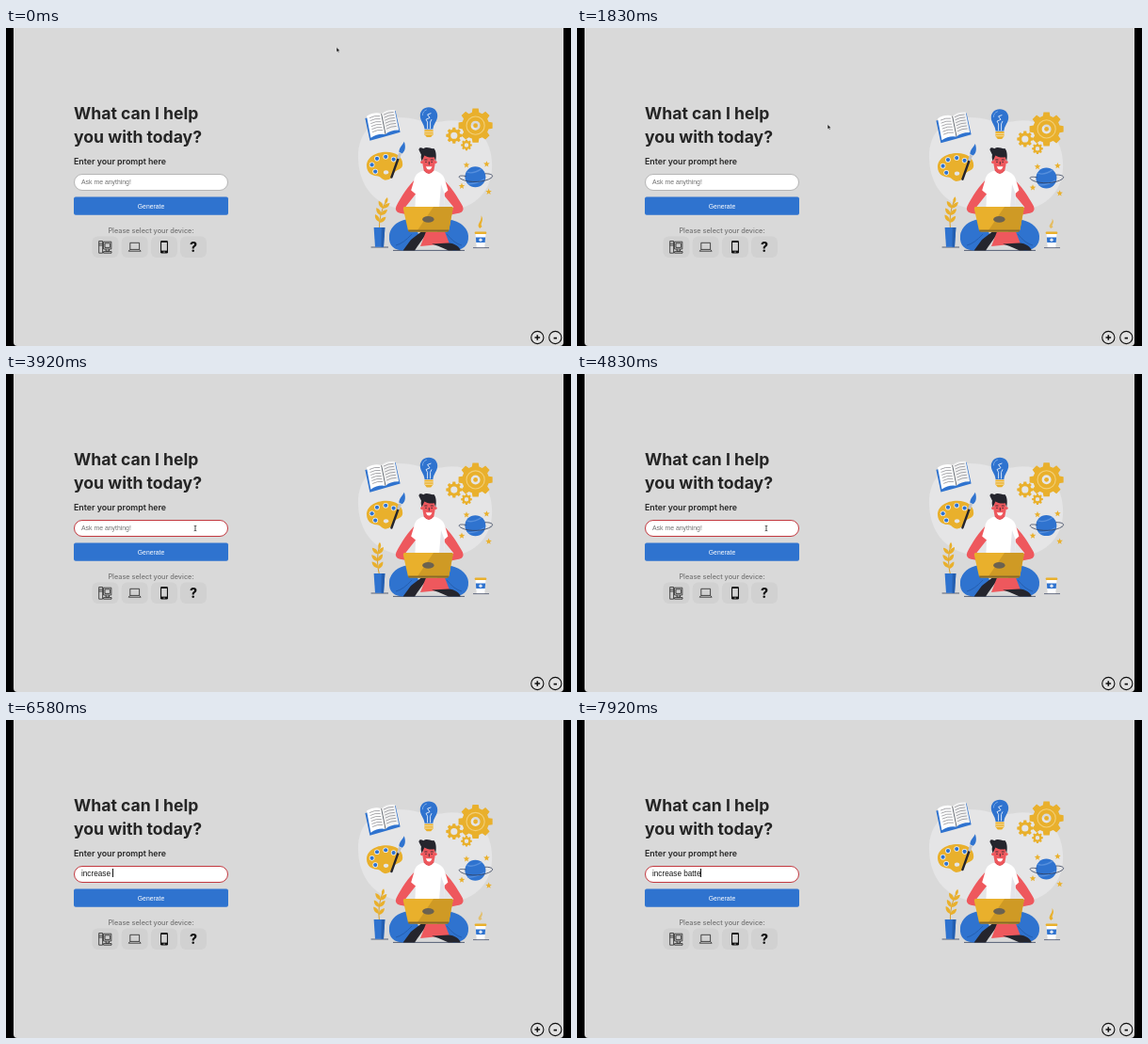
Write an HTML page that moves like this. It is 600 px wide and 338 px high and loops after 8000 ms.

```html
<!DOCTYPE html>
<html lang="en">
<head>
<meta charset="utf-8">
<title>Prompt page</title>
<style>
  html, body { margin: 0; width: 100%; height: 100%; overflow: hidden; background: #000; }
  #stage { position: relative; width: 600px; height: 338px; --u: 0; }
  svg { position: absolute; left: 0; top: 0; display: block; }
  .ui { font-family: Inter, "Open Sans", sans-serif; fill: #252525; }
  .arial { font-family: "Liberation Sans", Arial, sans-serif; }
  .field {
    position: absolute; left: 72px; top: 154.7px; width: 164px; height: 18.3px;
    box-sizing: border-box; border: 0.8px solid #b5b5b5; border-radius: 9.2px;
    background: #fff; padding-left: 7px; white-space: pre;
    font: 8.2px/16.9px "Liberation Sans", Arial, sans-serif; color: #161616;
  }
  .field.focus { border-color: #c2383f; }
  .hint { font-size: 6.9px; color: #707070; position: absolute; left: 7px; top: 0; }
  .caret { display: inline-block; width: 0.7px; height: 9px; background: #111; vertical-align: -1.6px; }
  .bob { transform: translateY(calc(var(--u) * var(--d) * 1px)); }
  #leaves { transform-origin: 396px 213px; transform: rotate(calc(var(--u) * -14deg)); }
  #steam { transform-origin: 503px 213px; transform: scaleY(calc(1 - var(--u) * .6)); opacity: calc(1.25 - var(--u) * 1.3); }
  .y { fill: #e9b02c; } .b { fill: #2f73cf; } .r { fill: #ee585d; } .k { fill: #25252d; } .w { fill: #fff; }
</style>
</head>
<body>
<div id="stage">
  <svg width="600" height="338" viewBox="0 0 600 338">
    <defs>
      <path id="star" d="M0-3.4 .9-1.1 3.3-1 1.4.6 2 2.9 0 1.6-2 2.9-1.4.6-3.3-1-.9-1.1Z"/>
      <path id="leaf" d="M0 0C-.8-4 1.2-6.4 4.6-8 5.2-4 3.6-1.2 0 0Z"/>
      <g id="dab"><circle r="2.8" fill="#f4f4f4"/><circle r="2.1" class="b"/></g>
    </defs>
    <path d="M8 0H592V334Q592 338 588 338H12Q8 338 8 334Z" fill="#d9d9d9"/>

    <g class="ui">
      <g font-size="17.6" font-weight="700">
        <text x="72" y="96.5">What can I help</text>
        <text x="72" y="122">you with today?</text>
      </g>
      <text x="72" y="144.8" font-size="8.8" font-weight="600">Enter your prompt here</text>
      <text x="154" y="217.6" font-size="7.3" font-weight="500" text-anchor="middle" style="fill:#747474">Please select your device:</text>
    </g>
    <rect x="72" y="179.6" width="164" height="19.2" rx="2" class="b"/>
    <text x="154" y="191.6" font-size="6.8" text-anchor="middle" class="arial w">Generate</text>

    <!-- device tiles -->
    <g fill="#d1d1d1">
      <rect x="91.5" y="221.5" width="28" height="22.5" rx="6"/>
      <rect x="122.7" y="221.5" width="28" height="22.5" rx="6"/>
      <rect x="153.9" y="221.5" width="28" height="22.5" rx="6"/>
      <rect x="185" y="221.5" width="28" height="22.5" rx="6"/>
    </g>
    <g fill="none" stroke="#222" stroke-width=".8">
      <path d="M98.7 226.5H102.6V239.2H98.7ZM98.7 229H102.6M98.7 231H102.6M103.6 227.2H111.8V235H103.6ZM105 228.8H110.4V233.4H105ZM106 235V237H109.5V235M103.6 239.2V237.6H112V239.2Z"/>
      <path d="M131.8 228.3H141.6V235.4H131.8ZM131.8 235.4 130.2 237.2H143.2L141.6 235.4"/>
    </g>
    <rect x="164" y="226" width="8" height="13.6" rx="1.4" fill="#111"/>
    <rect x="165.1" y="228" width="5.8" height="8.6" fill="#d3d3d3"/>
    <circle cx="168" cy="238.1" r=".7" fill="#d3d3d3"/>
    <text x="199" y="237.8" font-size="14" font-weight="800" text-anchor="middle" class="ui" style="fill:#111">?</text>

    <!-- zoom buttons -->
    <g fill="#e2e2e2" stroke="#111" stroke-width="1.1">
      <circle cx="564.3" cy="329" r="6.6"/><circle cx="583.3" cy="329" r="6.6"/>
    </g>
    <path d="M561.5 329H567.1M564.3 326.2V331.8M581.6 329.6H585" stroke="#111" stroke-width="1.6"/>

    <!-- illustration -->
    <path d="M374 139C373 112 389 96 414 95 436 94 443 103 465 99 492 94 514 112 516 142 518 171 499 195 463 194 441 193 428 196 407 189 386 181 375 163 374 139Z" fill="#e5e5e6"/>

    <g class="bob" style="--d:6">
      <path class="b" d="M381.4 96 386.4 119.8 402 115.4 418.6 110.6 413.6 88 398 92Z"/>
      <path class="w" d="M383 93.6Q392 88.6 398.6 91.2L403 113Q395 111.4 387.4 116.8Z"/>
      <path fill="#f3f3f3" d="M398.6 91.2Q404 86.4 412.8 87L417.2 108.4Q408 108.2 403 113Z"/>
      <path d="M398.6 91.2 403 113" stroke="#444" stroke-width=".7"/>
      <g id="lines" fill="none" stroke="#6d6d74" stroke-width=".6"></g>
    </g>

    <g class="bob" style="--d:4.5">
      <path class="b" d="M449 84.3C443.4 84.3 439.8 88.2 439.8 93.2 439.8 99 444 101.4 444.6 107.6H453.4C454 101.4 458.2 99 458.2 93.2 458.2 88.2 454.6 84.3 449 84.3Z"/>
      <path d="M442.3 93Q442.5 88.2 446.8 86.8" fill="none" stroke="#79a9e6" stroke-width="1"/>
      <path d="M447.6 107V100L446 97.2 450 95.4 447.6 92 451.4 90.6M450.6 107V100L452 97" fill="none" stroke="#fff" stroke-width=".8"/>
      <path class="y" d="M444.4 108.2H453.6V113.2L451.2 116H446.8L444.4 113.2Z"/>
      <path d="M444.4 110.4H453.6M444.6 112.8H453.4" stroke="#fff" stroke-width=".6"/>
    </g>

    <g class="bob" style="--d:9" id="gears"></g>

    <g class="bob" style="--d:3">
      <path class="y" d="M383 147C382.6 138 392 131.8 404 131.8 414 131.8 421.4 137 421.2 145 421 150 416 150.4 413.4 152.4 410.6 155 411.4 160 404 161.6 400 162.4 398.4 157.6 393.6 157.2 387.8 156.8 383.4 153.6 383 147Z"/>
      <use href="#dab" x="388.6" y="145.4"/><use href="#dab" x="394" y="138.8"/>
      <use href="#dab" x="403.2" y="136.8"/><use href="#dab" x="411.6" y="139.6"/>
      <use href="#dab" x="392.2" y="152.6"/>
      <ellipse cx="403.6" cy="153.4" rx="2.7" ry="2.1" fill="#e5e5e6"/>
    </g>
    <g class="bob" style="--d:5">
      <path d="M416.8 138 409.4 158.6" stroke="#25252d" stroke-width="2.4" stroke-linecap="round"/>
      <path d="M418.6 133 416.4 139" stroke="#bfc1c7" stroke-width="3"/>
      <path class="b" d="M422.8 120.8C421.4 124.4 417.4 126.8 417.4 131.8L420.8 133.4C424.6 130.4 424.4 125 422.8 120.8Z"/>
    </g>

    <g class="bob" style="--d:3">
      <circle class="b" cx="498.4" cy="158.2" r="11"/>
      <path d="M489.6 153Q496 155.6 505 149.6M490.2 165.4Q498 166.6 508 160.6" fill="none" stroke="#568fdd" stroke-width="1.3"/>
      <path d="M488.6 157.6C481 156 478.8 158 484 160.8 492 165 509 164 515.4 159.2 518.6 156.6 515 154.6 508.6 154.8" fill="none" stroke="#34405c" stroke-width=".8"/>
    </g>
    <g class="bob y" style="--d:4">
      <use href="#star" x="489" y="145.6"/><use href="#star" x="510.4" y="144.6"/><use href="#star" x="484" y="168"/>
      <use href="#star" x="512.6" y="174"/>
    </g>

    <g id="leaves">
      <path d="M396.4 214Q396 198 403.6 184" fill="none" stroke="#d69d25" stroke-width=".9"/>
      <g class="y">
        <use href="#leaf" transform="translate(396.6 207) rotate(18)"/>
        <use href="#leaf" transform="translate(396.6 206) scale(-1 1)"/>
        <use href="#leaf" transform="translate(398 199) rotate(20)"/>
        <use href="#leaf" transform="translate(398 199) scale(-1 1)"/>
        <use href="#leaf" transform="translate(400.4 191.8) rotate(22)"/>
        <use href="#leaf" transform="translate(400.4 191.8) scale(-1 1)"/>
        <use href="#leaf" transform="translate(402.8 187) rotate(-12) scale(.8)"/>
      </g>
    </g>
    <path d="M387.6 233H406" stroke="#34405c" stroke-width=".8"/>
    <path class="b" d="M390.6 212H402.4L401 232.8H392Z"/>
    <path d="M398.8 212H402.4L401 232.8H398.4Z" fill="#255fb0"/>

    <path id="steam" class="y" d="M503.2 213C498.6 208.6 505.6 206 504.6 199.2 508.6 205 502.4 208 505.6 211Z"/>
    <path class="w" d="M498.6 219H509.4L508.2 233.4H499.8Z"/>
    <path class="b" d="M498.9 222.4H509.1L508.7 228H499.3Z"/>
    <circle cx="504" cy="225.2" r="1.7" fill="#dfe8f5"/>
    <rect class="y" x="497.8" y="216.4" width="12.4" height="2.7" rx=".8"/>
    <path d="M496 233.6H513" stroke="#34405c" stroke-width=".7"/>

    <!-- seated figure -->
    <path d="M411 236.4H487" stroke="#34405c" stroke-width=".8"/>
    <path class="b" d="M433 203C420 202 408 209 407 221 406 232 413 236.4 422 236.4L440 226Z"/>
    <path class="b" d="M462 203C476 202 490 209 491 221 491.6 232 484 236.6 475 236.4L455 226Z"/>
    <path d="M414 231Q422 229 431 219M484 231Q476 229 468 219" fill="none" stroke="#255fb0" stroke-width="1"/>
    <path class="k" d="M421.6 236.6 430 225 441 216.4H448L437 232 434 236.6Z"/>
    <path class="r" d="M440 232 446 216.4H466L471 229.4 455 230.6Z"/>
    <path class="k" d="M452 229.6 470 228.4C476 228.6 482.6 233 482.6 236.6H470L459 231.8Z"/>
    <path class="r" d="M435.6 160C429 165 419 180 414.4 189.6 412.6 194.4 415.6 196.6 420 197L429 199 431 194 424 190.4 437 174Z"/>
    <path class="r" d="M463 160C470 165 480 180 485 189.6 486.8 194.4 484 196.6 479.6 197L470 199 468 194 475.4 190.4 462 174Z"/>
    <path class="w" d="M443.4 151.6C437 153.6 434.4 156 433 163L430.2 172.6 435 176.4 434.4 192H466L465.6 176 469.4 172.6 466.6 163C465 156.6 462 154 455.4 151.6Z"/>
    <path d="M462 166 460 191H466L465.6 176Z" fill="#e4e4e9"/>
    <path d="M443.6 146H454.4V151.6Q449 158.4 443.6 151.6Z" fill="#d8464f"/>
    <path class="r" d="M442.4 134H455.6V143.6C455.4 150.4 452.6 154.2 449 154.2 445.4 154.2 442.8 150.2 442.4 143.6Z"/>
    <circle class="r" cx="441.8" cy="142.6" r="1.7"/><circle class="r" cx="456" cy="142.6" r="1.7"/>
    <path class="k" d="M441.6 141.4C440.4 138.6 440.6 136.2 441 134.8L438.4 129.4C438.6 126.6 441.4 126.8 443.2 128.2 447 125.4 451.4 128.8 454.4 128 457 130.6 457.2 137 456.2 141.4L454.8 137.2C450.6 138 446.4 136.8 444.4 135.4Z"/>
    <path d="M444.4 140H447.4M450.8 140H453.8M445.2 142.4H446.8M451.4 142.4H453M449.3 142V145.4" fill="none" stroke="#25252d" stroke-width=".8"/>
    <path class="w" d="M445.8 147.2H452.4Q451.4 150.6 449 150.6 446.8 150.4 445.8 147.2Z"/>

    <path class="y" d="M423.6 190H473Q475 190 474.6 192L470.4 214.6Q470 216.4 468 216.4H429Q427.2 216.4 426.8 214.6L421.8 192Q421.6 190 423.6 190Z"/>
    <path d="M454 190H473Q475 190 474.6 192L470.4 214.6Q470 216.4 468 216.4H436Z" fill="#cf9a25"/>
    <path d="M427 214.4H470.2L469.6 216.4H427.6Z" fill="#876a28"/>
    <ellipse cx="448.4" cy="203.4" rx="6.2" ry="3.3" fill="#6b6250"/>
  </svg>

  <div class="field" id="field"><span class="hint" id="hint">Ask me anything!</span><span id="typed"></span><span class="caret" id="caret"></span></div>

  <svg width="600" height="338" viewBox="0 0 600 338">
    <path id="arrow" d="M0 0V5L1.2 4 2 5.7 2.9 5.3 2.1 3.7H3.7Z" fill="#111" stroke="#fff" stroke-width=".4"/>
    <path id="beam" d="M-1.3-2.7Q0-2.7 0-2 0-2.7 1.3-2.7M0-2V2M-1.3 2.7Q0 2.7 0 2 0 2.7 1.3 2.7" fill="none" stroke="#222" stroke-width=".8"/>
  </svg>
</div>
<script>
const $ = id => document.getElementById(id);
const LOOP = 8000, FOCUS = 3100, BLINK = 1060;
const PHRASE = "increase batte";
const typedAt = i => i < 9 ? 5100 + 170 * i : 6800 + 265 * (i - 9);

function gear(x, y, r, root, hole, teeth) {
  const pts = [], step = Math.PI * 2 / teeth;
  for (let i = 0; i < teeth; i++) {
    [[-.34, root], [-.22, r], [.22, r], [.34, root]].forEach(([k, d]) => {
      const a = (i + k) * step;
      pts.push((x + d * Math.sin(a)).toFixed(2) + " " + (y - d * Math.cos(a)).toFixed(2));
    });
  }
  return `<path class="y" fill-rule="evenodd" d="M${pts.join("L")}ZM${x - hole} ${y}a${hole} ${hole} 0 1 0 ${2 * hole} 0a${hole} ${hole} 0 1 0 ${-2 * hole} 0Z"/>`;
}
$("gears").innerHTML =
  gear(498.6, 103.6, 18.3, 14.4, 5, 8) +
  '<circle cx="498.6" cy="103.6" r="9.6" fill="none" stroke="#f3cf78" stroke-width="1.1"/>' +
  '<circle cx="498.6" cy="103.6" r="2.4" class="y"/>' +
  gear(475.8, 114.2, 8.6, 6.6, 3.6, 8) +
  gear(489, 124.4, 5.9, 4.5, 2.2, 8);

let d = "";
for (let i = 0; i < 6; i++) {
  const x = 386 + i * .62, y = 95.6 + i * 3;
  d += `M${x} ${y}q5.5-2.9 11-2M${x + 15} ${y - 3.4}q4.5-2.8 10.6-2.8`;
}
$("lines").innerHTML = `<path d="${d}"/>`;

const ease = p => p < .5 ? 4 * p ** 3 : 1 - (2 - 2 * p) ** 3 / 2;

function draw(now) {
  const t = now % LOOP;
  const sway = (1 + Math.cos((t - 4300) / 9000 * Math.PI * 2)) / 2;
  $("stage").style.setProperty("--u", sway.toFixed(4));

  const p = ease(Math.min(1, Math.max(0, (t - 1200) / 1200)));
  $("arrow").setAttribute("transform", `translate(${351 - 148 * p} ${20.6 + 142.8 * p})`);
  $("arrow").style.display = t < 2800 ? "" : "none";
  $("beam").setAttribute("transform", "translate(201 164)");
  $("beam").style.display = t >= 2800 && t < typedAt(0) ? "" : "none";

  let n = 0;
  while (n < PHRASE.length && t >= typedAt(n)) n++;
  const since = t - (n ? typedAt(n - 1) : FOCUS);
  $("typed").textContent = PHRASE.slice(0, n);
  $("hint").style.display = n ? "none" : "";
  $("field").className = t >= FOCUS ? "field focus" : "field";
  $("caret").style.visibility = t >= FOCUS && since % BLINK < BLINK / 2 ? "visible" : "hidden";
}
function tick(now) {
  draw(now);
  requestAnimationFrame(tick);
}
draw(0);
requestAnimationFrame(tick);
</script>
</body>
</html>
```
